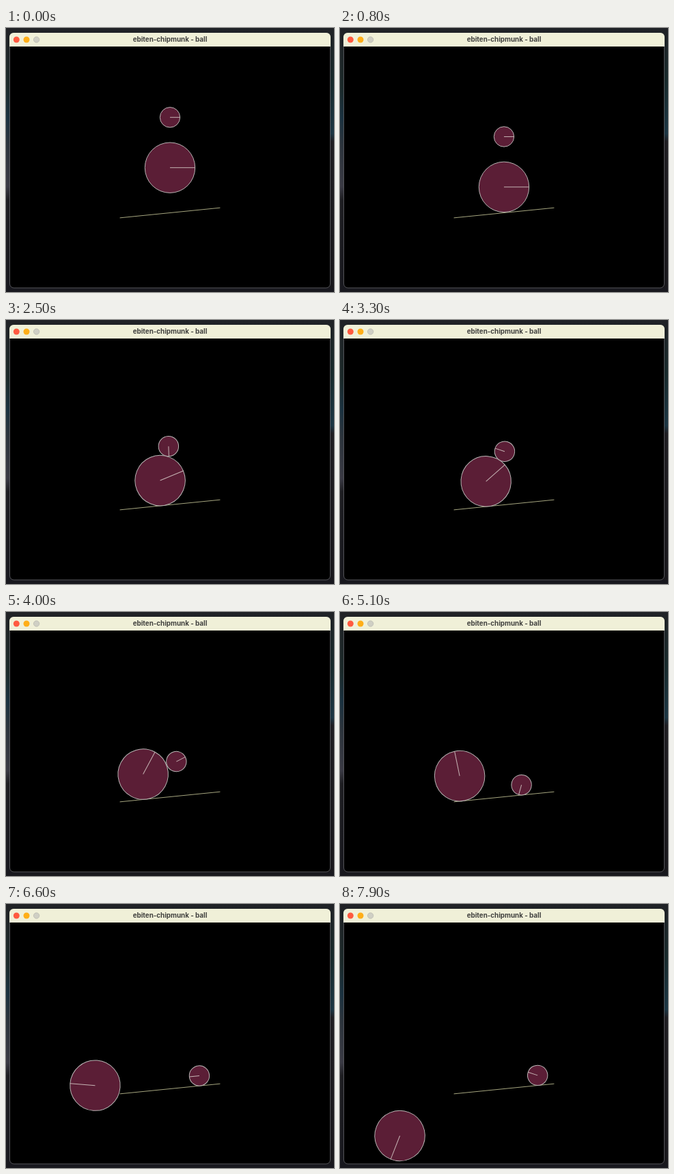
These frames come from a looping animation (480 px wide and 385 px high, 8000 ms). An HTML page:

```html
<!DOCTYPE html>
<html lang="en">
<head>
<meta charset="utf-8">
<title>ebiten-chipmunk - ball</title>
<style>
  html, body { margin: 0; width: 100%; height: 100%; overflow: hidden; background: #191920; }
  svg { display: block; width: 480px; height: 385px; }
  .title { font: 700 9.8px Inter, "Open Sans", sans-serif; fill: #40403e; text-anchor: middle; }
  .ball circle { fill: #5b1e36; stroke: #b9b4b4; }
  .ball line { stroke: #c6b4b4; }
</style>
</head>
<body>
<svg viewBox="0 0 480 385">
  <defs>
    <linearGradient id="left" x2="0" y2="1">
      <stop offset="0" stop-color="#212226"/>
      <stop offset=".22" stop-color="#1c2a2a"/>
      <stop offset=".34" stop-color="#1b3240"/>
      <stop offset=".44" stop-color="#2c343c"/>
      <stop offset=".6" stop-color="#3a3a44"/>
      <stop offset=".65" stop-color="#1e1e22"/>
      <stop offset="1" stop-color="#18181e"/>
    </linearGradient>
    <linearGradient id="right" x2="0" y2="1">
      <stop offset="0" stop-color="#202226"/>
      <stop offset=".2" stop-color="#182a2c"/>
      <stop offset=".4" stop-color="#1c3644"/>
      <stop offset=".43" stop-color="#1f1e22"/>
      <stop offset="1" stop-color="#19181c"/>
    </linearGradient>
    <clipPath id="frame"><rect x="5" y="7" width="470" height="372.5" rx="6"/></clipPath>
  </defs>

  <rect width="240" height="385" fill="url(#left)"/>
  <rect x="240" width="240" height="385" fill="url(#right)"/>
  <rect y="379" width="480" height="6" fill="#18181e"/>
  <rect x="5.5" y="7.5" width="469" height="371.5" rx="6" stroke="#6c6c72" stroke-opacity=".75"/>

  <g clip-path="url(#frame)">
    <rect x="5" y="7" width="470" height="20" fill="#f0f0d8"/>
    <circle cx="15.3" cy="17" r="4.5" fill="#ff5a40"/>
    <circle cx="30" cy="17" r="4.5" fill="#ffae18"/>
    <circle cx="44.6" cy="17" r="4.2" fill="#cfcfc4" stroke="#b6b6ac" stroke-width=".7"/>
    <text class="title" x="240" y="20.2">ebiten-chipmunk - ball</text>

    <!-- physics space, 640 x 480 units -->
    <g transform="translate(5.1 27.3) scale(.734)" stroke-width="1.36">
      <line x1="220" y1="340" x2="420" y2="320" stroke="#a6a680"/>
      <g class="ball" id="big"><circle r="50"/><line x2="50"/></g>
      <g class="ball" id="small"><circle r="20"/><line x2="20"/></g>
    </g>
  </g>
</svg>

<script>
const LOOP = 8000, STEP = 100;
const HALF_G = 50, HEAD_START = 0.08;

// Moments, in seconds, where the motion changes character.
const BIG = { land: 0.81, edge: 5.55, leave: 6.3, floor: 7.495 };
const SMALL = { land: 1.103, leave: 3.69, touch: 4.449 };

// Cubic path through keys of [time, value, rate].
function curve(keys, t) {
  let i = 0;
  while (i < keys.length - 2 && t > keys[i + 1][0]) i++;
  const [t0, a, va] = keys[i], [t1, b, vb] = keys[i + 1];
  const d = t1 - t0, u = (t - t0) / d, w = 1 - u;
  return w * w * ((1 + 2 * u) * a + u * d * va) + u * u * ((3 - 2 * u) * b - w * d * vb);
}

const pivotX = [[BIG.edge, 215, -38.3], [BIG.leave, 183.8, -41]];
const pivotY = [[BIG.edge, 290.2, 3.8], [BIG.leave, 305.5, 43]];
const pivotTurn = [[BIG.edge, 2.11, 0.77], [BIG.leave, 2.77, 0.98]];
const lean = [[SMALL.land, 0.0286, 0.105], [1.6, 0.083, 0.13], [2.5, 0.242, 0.26], [SMALL.leave, 0.86, 0.95]];
const spin = [[SMALL.land, 0, 0.5], [1.6, 0.33, 0.95], [2.5, 1.536, 1.78], [SMALL.leave, 4.725, 3.5]];

const fall = (y, t) => y + HALF_G * (t + HEAD_START) ** 2;
const onRamp = (x, r) => 340 - 0.1 * (x - 220) - 1.005 * r;

function bigBall(t) {
  if (t < BIG.land) return { x: 320, y: Math.min(fall(240, t), onRamp(320, 50)), a: 0 };
  if (t < BIG.edge) {
    const s = t - BIG.land, d = 5.8 * s + 3.45 * s * s;
    return { x: 320 - d, y: onRamp(320 - d, 50), a: -d * 1.005 / 50 };
  }
  if (t < BIG.leave) return { x: curve(pivotX, t), y: curve(pivotY, t), a: -curve(pivotTurn, t) };
  const s = t - BIG.leave, a = -2.77 - 0.98 * s;
  if (t < BIG.floor) return { x: 183.8 - 43.5 * s, y: 305.5 + 44.5 * s + HALF_G * s * s, a };
  const b = t - BIG.floor;
  return { x: 131.8 - 47.9 * b, y: 430 - 36.8 * b + HALF_G * b * b, a };
}

function smallBall(t, big) {
  if (t < SMALL.land) return { x: 320, y: fall(140, t), a: 0 };
  if (t < SMALL.leave) {
    const p = curve(lean, t);
    return { x: big.x + 70 * Math.sin(p), y: big.y - 70 * Math.cos(p), a: curve(spin, t) };
  }
  if (t < SMALL.touch) {
    const s = t - SMALL.leave;
    return { x: 327.7 + 16.2 * s, y: 238.7 + 53 * s + HALF_G * s * s, a: 4.725 + 3.5 * s };
  }
  const s = t - SMALL.touch, d = 25 * s - 3.3 * s * s;
  return { x: 340 + d, y: onRamp(340 + d, 20), a: 7.38 + d * 1.005 / 20 };
}

function place(id, { x, y, a }) {
  document.getElementById(id).setAttribute("transform", `translate(${x} ${y}) rotate(${a * 180 / Math.PI})`);
}

function draw(ms) {
  const t = Math.floor((ms % LOOP) / STEP) * STEP / 1000;
  const big = bigBall(t);
  place("big", big);
  place("small", smallBall(t, big));
}

const start = performance.now();
function tick() {
  draw(performance.now() - start);
  requestAnimationFrame(tick);
}
tick();
</script>
</body>
</html>
```
